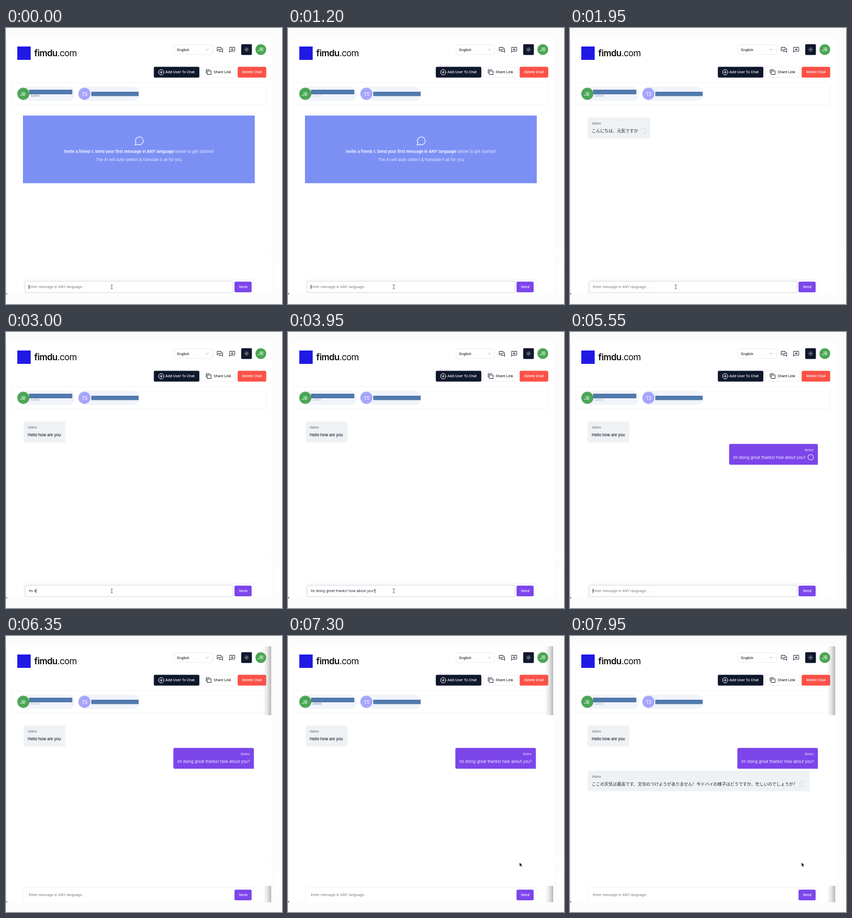
These frames come from a looping animation (537x537 px, 8000 ms). An HTML page:

```html
<!DOCTYPE html>
<html lang="en">
<head>
<meta charset="utf-8">
<title>Translated chat</title>
<style>
  html, body { margin: 0; width: 100%; height: 100%; overflow: hidden; background: #fcfcfc; }
  svg { display: block; width: 100%; height: 100%; }
  text { font: 6.8px Inter, "Noto Sans CJK JP", "Noto Sans CJK", sans-serif; fill: #1b2230; white-space: pre; }
  .button { font-weight: 500; }
  .white { fill: #fff; }
  .middle { text-anchor: middle; }
  .avatar { font: 9px Roboto, sans-serif; fill: #fff; text-anchor: middle; }
  .logo { font-size: 17px; letter-spacing: -.5px; fill: #080808; }
  .bold { font-weight: 600; }
  .banner { font-size: 7.7px; fill: #e6eaff; text-anchor: middle; }
  .name { font-size: 6.2px; font-style: italic; fill: #555c68; }
  .message { font-size: 7.55px; font-weight: 500; }
  .japanese { font-family: "Noto Sans CJK JP", "Noto Sans CJK", sans-serif; font-size: 8.2px; }
  .mark { font-family: "Noto Sans CJK SC", "Noto Sans CJK", sans-serif; }
  .sent { fill: #f3edff; font-weight: 400; }
  .message.sent { font-size: 7.7px; }
  .end { text-anchor: end; }
  .line { fill: none; stroke: #1b2230; stroke-width: 1; stroke-linecap: round; stroke-linejoin: round; }
</style>
</head>
<body>
<svg viewBox="0 0 537 537" preserveAspectRatio="none">
  <defs>
    <linearGradient id="shade">
      <stop offset="0" stop-color="#888" stop-opacity="0"/>
      <stop offset=".5" stop-color="#888" stop-opacity=".2"/>
      <stop offset="1" stop-color="#888" stop-opacity=".6"/>
    </linearGradient>
  </defs>

  <rect width="537" height="537" fill="#fcfcfc"/>
  <rect x=".5" y="20" width="515.5" height="498" rx="2" fill="#fff"/>
  <path d="M.5 20V516" stroke="#f1f1f1"/>
  <path d="M0 515L3 518H0Z" fill="#555"/>
  <g fill="none" stroke="#fff">
    <path d="M519 439V430M519 433q3-4 6 0v6M525 433q4-4 7 0v6" stroke-width="2"/>
    <path d="M529 512V474q0-17 11-17M520 476H537" stroke-width="6"/>
  </g>

  <rect x="22" y="36" width="26" height="26" fill="#2019e6"/>
  <text class="logo" x="55" y="55"><tspan class="bold">fimdu</tspan>.com</text>

  <rect x="327" y="32.5" width="75" height="19" rx="2.5" fill="#fff" stroke="#e9ebef"/>
  <text class="button" x="333" y="44.5">English</text>
  <path class="line" d="M389 41l2.4 2.2L393.8 41" style="stroke:#888;stroke-width:.8"/>
  <path class="line" d="M411 44.5V37.5H418.5V42.5H413Z M420.5 40H421.5V47.5L419.5 45.5H414.5V44.5"/>
  <path class="line" d="M435 47V37.5H445V45H437Z M440 39.5V43.5M438 41.5H442"/>
  <rect x="457.6" y="31.6" width="20.8" height="20.8" rx="2" fill="#0f172a"/>
  <g class="line" style="stroke:#d9dce2;stroke-width:.8">
    <circle cx="468" cy="42" r="1.8"/>
    <path d="M468 37.8v.8M468 45.4v.8M463.8 42h.8M471.4 42h.8M465 39l.6.6M470.4 44.4l.6.6M465 45l.6-.6M470.4 39.6l.6-.6"/>
  </g>
  <circle cx="495.8" cy="42" r="10.5" fill="#4ba654"/>
  <text class="avatar" x="495.5" y="45.2">JB</text>

  <rect x="287.6" y="75.6" width="88.6" height="20.8" rx="2.5" fill="#0f172a"/>
  <g class="line" style="stroke:#fff">
    <circle cx="302" cy="86" r="5.2"/><path d="M302 83.5v5M299.5 86h5"/>
  </g>
  <text class="button white" x="310" y="88.4">Add User To Chat</text>
  <rect x="380" y="76.2" width="67" height="19.6" rx="2.5" fill="#fff" stroke="#edeff2"/>
  <path class="line" d="M392 83.5H399V90.5H392ZM389.5 88V81H396.5"/>
  <text class="button" x="404" y="88.4">Share Link</text>
  <rect x="450.7" y="75.6" width="55.6" height="20.8" rx="2.5" fill="#fb5148"/>
  <text class="button white middle" x="478.5" y="88.4">Delete Chat</text>

  <rect x="11" y="106.5" width="495" height="43.5" rx="4" fill="none" stroke="#f2f4f6" stroke-width="1.2"/>
  <g fill="#f1f4fa">
    <rect x="20" y="114" width="114" height="28" rx="14"/>
    <rect x="140" y="114" width="120" height="28" rx="14"/>
  </g>
  <circle cx="33.8" cy="128" r="11.7" fill="#4ba654"/>
  <text class="avatar" x="32.5" y="131.5">JB</text>
  <circle cx="152.6" cy="128" r="11.7" fill="#a6a5fc"/>
  <text class="avatar" x="153" y="131.5">TS</text>
  <g fill="#5179ac">
    <rect x="45" y="120" width="84" height="9"/>
    <rect x="166" y="124" width="92" height="8.5"/>
  </g>
  <text id="admin" x="48" y="134" style="font-size:5.8px;fill:#7580a3">Admin</text>

  <g id="banner">
    <rect x="33" y="170.3" width="451" height="131.7" fill="#7c90f4"/>
    <path class="line" style="stroke:#f5f6ff;stroke-width:1.3" d="M251 228l1.7-5A7.6 7.6 0 1 1 256 226.3Z"/>
    <text class="banner" x="258.5" y="243"><tspan class="bold white">Invite a friend</tspan> &amp; <tspan class="bold white">Send your first message in ANY language</tspan> below to get started!</text>
    <text class="banner" x="258.5" y="259">The AI will auto-detect &amp; translate it all for you</text>
  </g>

  <g id="chat"></g>

  <rect x="34.5" y="489.5" width="448" height="34" rx="3" fill="none" stroke="#f3f3f5"/>
  <rect x="0" y="518" width="537" height="19" fill="#fcfcfc"/>
  <rect id="focus" x="37" y="492.5" width="405" height="22.5" rx="3" fill="#fff" stroke="#cdd0d8"/>
  <text id="field" x="44.5" y="506.3"></text>
  <path id="caret" d="M0 499.5V508" stroke="#222" stroke-width=".8"/>
  <path id="beam" class="line" style="stroke:#555;stroke-width:.9" d="M204.3 499.5q1.5 0 1.5 1q0-1 1.5-1M205.8 500.5V506.5M204.3 507.5q1.5 0 1.5-1q0 1 1.5 1"/>
  <rect x="444.6" y="493.6" width="33.3" height="20.6" rx="2.5" fill="#7c45ea"/>
  <text class="button white middle" x="461.3" y="506.3">Send</text>

  <path id="edge" d="M500 20H516V154H500ZM500 486H516V518H500Z" fill="url(#shade)"/>
  <path id="pointer" d="M450.5 440.5v8l1.9-1.7 1.3 2.7 1.3-.6-1.3-2.6h2.3Z" fill="#111" stroke="#fff" stroke-width=".4"/>
</svg>
<script>
const LOOP = 8000;
const TIMES = {
  greet: 1600, greetDone: 2300, type: 2950, typed: 3450,
  send: 4400, sendDone: 5650, blur: 5900, pointer: 7300, reply: 7500
};
const SENDER = "Velmo";
const PLACEHOLDER = "Enter message in ANY language...";
const ANSWER = "Im doing great thanks! how about you?";

const byId = id => document.getElementById(id);
const show = (id, visible) => byId(id).setAttribute("visibility", visible ? "visible" : "hidden");

// Rounded bubble with one square corner at the bottom, on the sender's side.
function bubblePath(left, right, top, sent) {
  const r = 3, bottom = top + 40.5;
  const rightCorner = sent ? `V${bottom}` : `V${bottom - r}q0 ${r} ${-r} ${r}`;
  const leftCorner = sent ? `H${left + r}q${-r} 0 ${-r} ${-r}` : `H${left}`;
  return `M${left + r} ${top}H${right - r}q${r} 0 ${r} ${r}${rightCorner}${leftCorner}V${top + r}q0 ${-r} ${r} ${-r}Z`;
}

function spinner(x, y, t, sent) {
  if (sent) return `<circle cx="${x}" cy="${y}" r="5.4" fill="none" stroke="#e4d8fc" stroke-width="1.2"/>`;
  const angle = t / 700 * 360 - 85;
  return `<circle cx="${x}" cy="${y}" r="5.6" fill="none" stroke="#d5d8de" stroke-width="1.2"
    pathLength="360" stroke-dasharray="270 90" transform="rotate(${angle} ${x} ${y})"/>`;
}

function bubble({ left, right, top, text, sent, japanese, spin }, t) {
  const nameAt = sent ? right - 8 : left + 8;
  const kind = (sent ? " sent" : "") + (japanese ? " japanese" : "");
  return `<path d="${bubblePath(left, right, top, sent)}" fill="${sent ? "#7c45ea" : "#eff2f5"}"/>
    <text class="name${sent ? " sent end" : ""}" x="${nameAt}" y="${top + 14}">${SENDER}</text>
    <text class="message${kind}" x="${left + 8}" y="${top + 29}">${text}</text>
    ${spin ? spinner(right - 14, top + 26, t, sent) : ""}`;
}

function messages(t) {
  const list = [];
  if (t >= TIMES.greet) {
    const waiting = t < TIMES.greetDone;
    list.push({
      left: 34.3, right: waiting ? 156.3 : 115.3, top: 174.2, spin: waiting, japanese: waiting,
      text: waiting ? "こんにちは、元気ですか" : "Hello how are you"
    });
  }
  if (t >= TIMES.send) {
    const waiting = t < TIMES.sendDone;
    list.push({ left: waiting ? 309.6 : 325.6, right: 482.3, top: 217.8, text: ANSWER, sent: true, spin: waiting });
  }
  if (t >= TIMES.reply) {
    list.push({
      left: 34.3, right: 466.8, top: 261.8, japanese: true, spin: true,
      text: "ここの天気は最高です、文句のつけようがありません<tspan class='mark'>！</tspan>今ドバイの様子はどうですか、忙しいのでしょうか?"
    });
  }
  return list;
}

function drawField(t) {
  const typing = t >= TIMES.type && t < TIMES.send;
  const progress = Math.min(1, (t - TIMES.type) / (TIMES.typed - TIMES.type));
  const value = typing ? ANSWER.slice(0, Math.ceil(progress * ANSWER.length)) : "";
  const field = byId("field");
  field.textContent = value || PLACEHOLDER;
  field.style.fill = value ? "#1b2230" : "#70757f";

  const focused = t < TIMES.blur;
  const blinkTime = t >= TIMES.send ? t - TIMES.send : t;
  const caretX = value ? 45 + field.getComputedTextLength() : 44.5;
  byId("caret").setAttribute("transform", `translate(${caretX} 0)`);
  show("caret", focused && (typing || blinkTime % 1000 < 500));
  show("focus", focused);
}

function draw(t) {
  show("banner", t < TIMES.greet);
  byId("chat").innerHTML = messages(t).map(m => bubble(m, t)).join("");
  drawField(t);
  show("beam", t < TIMES.send);
  show("edge", t >= TIMES.blur);
  show("pointer", t >= TIMES.pointer);
  byId("admin").style.opacity = 0.65 + 0.3 * Math.cos(t / 2400 * 2 * Math.PI);
}

const start = performance.now();
function tick() {
  draw((performance.now() - start) % LOOP);
  requestAnimationFrame(tick);
}
tick();
</script>
</body>
</html>
```
